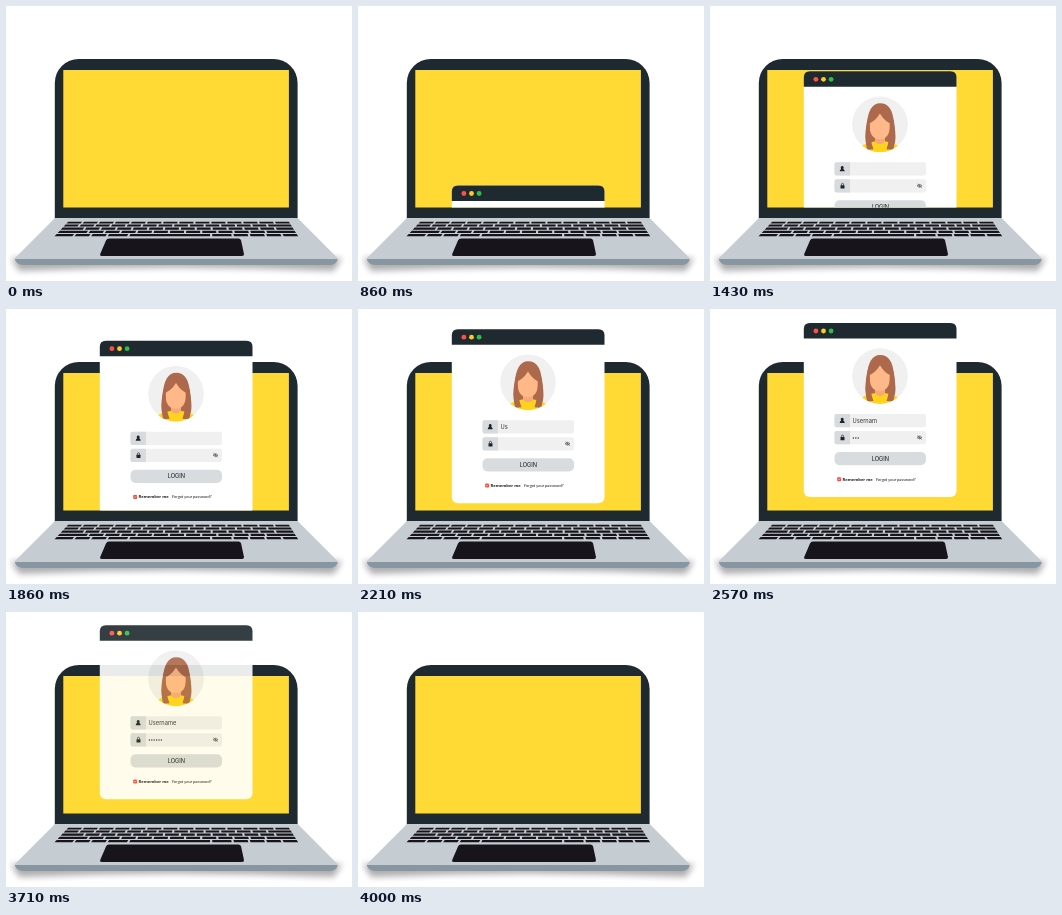
Write an HTML page that moves like this. It is 346 by 275 pixels and loops after 4210 ms.

```html
<!DOCTYPE html>
<html lang="en">
<head>
<meta charset="utf-8">
<title>Login on a laptop</title>
<style>
  html, body { margin: 0; width: 100%; height: 100%; overflow: hidden; background: #fff; }
  svg { display: block; width: 100%; height: 100%; }
  text { font-family: Inter, "Open Sans", sans-serif; fill: #15191c; }
</style>
</head>
<body>
<svg viewBox="0 0 346 275">
  <defs>
    <clipPath id="above"><rect width="346" height="201.5"/></clipPath>
    <clipPath id="round"><circle cx="170" cy="53" r="28"/></clipPath>
    <filter id="blur" x="-10%" y="-100%" width="120%" height="300%"><feGaussianBlur stdDeviation="3"/></filter>
  </defs>

  <!-- laptop -->
  <path d="M5 252H336L328 265Q170 258 13 265Z" fill="#000" opacity=".32" filter="url(#blur)"/>
  <path d="M48.8 213V77A24 24 0 0 1 72.8 53H267.6A24 24 0 0 1 291.6 77V213Z" fill="#1f2a30"/>
  <rect x="57.3" y="64" width="225.6" height="137.500" fill="#ffda35"/>
  <path d="M49 212H291.6L331.5 252V254H9V252Z" fill="#c5ccd2"/>
  <path d="M9 253H331.5V254Q330 259 323 259H18Q11 259 9 254Z" fill="#8796a1"/>
  <path id="keys" fill="#17151b"/>
  <path d="M103 232.5H232.5q2 0 2.600 2L238 248q.3 2-2 2H95.500q-2 0-1.300-2L100 234.500q.8-2 3-2Z" fill="#17151b"/>

  <!-- login window -->
  <g clip-path="url(#above)"><g id="card">
    <rect x="93.800" width="152.700" height="174" rx="6" fill="#fff"/>
    <path d="M93.800 15.500V6q0-6 6-6H240.500q6 0 6 6V15.500Z" fill="#1f2a30"/>
    <circle cx="105.900" cy="8" r="2.400" fill="#ff5147"/>
    <circle cx="113.500" cy="8" r="2.400" fill="#ffc928"/>
    <circle cx="121.100" cy="8" r="2.400" fill="#2fc042"/>

    <g clip-path="url(#round)">
      <circle cx="170" cy="53" r="28" fill="#f0f0f0"/>
      <path d="M170 32C162 32 158 40 157 52Q154 68 157 74H184Q187 68 184 52C183 39 179 32 170 32Z" fill="#ad694b"/>
      <path d="M148 82Q149 73 161 71L165 70H175L179 71Q191 73 192 82Z" fill="#ffd31c"/>
      <path d="M165 62H175V70.500Q170 75.500 165 70.500Z" fill="#f5a878"/>
      <path d="M159.300 54Q159 42 169.700 42Q180.500 42 180.200 54Q179.500 68 169.700 68Q160 68 159.300 54Z" fill="#ffb988"/>
      <path d="M172 38Q168 48 159.800 52Q159.500 68 163.500 78L157 78.500Q154 65 157 50Q160 36 172 38ZM168 38Q172 48 179.700 52Q180 68 176.500 78L183.500 78.500Q186 65 184 50Q180 36 168 38Z" fill="#ad694b"/>
    </g>

    <g id="fields"></g>
    <path d="M132.200 94.700a1.600 1.700 0 0 1 1 2.900Q134.700 98.200 134.700 100H129.700Q129.700 98.200 131.200 97.600A1.600 1.700 0 0 1 132.200 94.700Z" fill="#1f2327"/>
    <rect x="130.500" y="114" width="4" height="3.300" rx=".5" fill="#1f2327"/>
    <path d="M131.400 114.200V113.400a1.100 1.300 0 0 1 2.200 0V114.200" fill="none" stroke="#1f2327" stroke-width=".7"/>
    <g fill="none" stroke="#444" stroke-width=".6">
      <path d="M207 114.600Q209.500 111.500 212 114.600Q209.500 117.400 207 114.600ZM207.500 112.600L211.700 116.500"/>
      <circle cx="209.500" cy="114.500" r=".7"/>
    </g>
    <text id="user" x="142.600" y="99.600" font-size="5.700" style="fill:#333"></text>
    <g id="dots" fill="#333"></g>
    <rect x="124.500" y="129" width="91.500" height="13.300" rx="5" fill="#d9dcdf"/>
    <text x="170.400" y="137.600" font-size="5.650" text-anchor="middle">LOGIN</text>
    <rect x="127.200" y="154.300" width="3.900" height="3.900" rx="1" fill="#f9483c"/>
    <path d="M128.200 156.200L129 157L130.300 155.300" fill="none" stroke="#fff" stroke-width=".5"/>
    <text x="132.500" y="157.700" font-size="4.150" font-weight="700" style="font-family:'Open Sans',sans-serif">Remember me</text>
    <text x="166" y="157.700" font-size="4.250" font-style="italic" style="font-family:Lato,sans-serif">Forgot your password?</text>
  </g></g>
</svg>
<script>
const $ = id => document.getElementById(id);
const LOOP = 4210, STEP = 1000 / 14;

// keyboard: rows of relative key widths, in perspective
const plain = n => Array(n).fill(1);
const rows = [
  plain(14),
  [...plain(13), 1.6],
  [1.5, ...plain(12), 1.2],
  [1.9, ...plain(11), 1.9],
  [1.2, 1, 1, 1.3, 5, 1.3, 1, 1, 1, 1]
];
const ys = [215.8, 218.6, 221.6, 224.7, 227.9, 231.3];
const edge = (u, y) => {
  const d = y - 216, left = 61 - d * .95;
  return left + u * (284 + d * .65 - left);
};
$('keys').setAttribute('d', rows.map((row, i) => {
  const sum = row.reduce((a, b) => a + b), top = ys[i], low = ys[i + 1] - 1;
  let at = 0;
  return row.map(w => {
    const a = at / sum + .0045, b = (at += w) / sum - .0045;
    return `M${edge(a, top)} ${top}H${edge(b, top)}L${edge(b, low)} ${low}H${edge(a, low)}Z`;
  }).join('');
}).join(''));

$('fields').innerHTML = [91, 108].map(y =>
  `<rect x="124.500" y="${y}" width="91.500" height="13.300" rx="2" fill="#f0f0f1"/>
   <path d="M140 ${y}H126.500q-2 0-2 2v9.300q0 2 2 2H140Z" fill="#d8dbde"/>`).join('');
$('dots').innerHTML = [...Array(6).keys()].map(i =>
  `<circle cx="${143.400 + i * 2.400}" cy="114.900" r=".75"/>`).join('');

// window top by step, joined by a smooth curve
const path = [[10.7, 202], [16, 111], [18, 82.5], [20, 65.3], [26, 31.7], [34, 15.5], [36, 14], [40, 13.6]];
const slope = i => {
  const a = path[Math.max(i - 1, 0)], b = path[Math.min(i + 1, path.length - 1)];
  return (b[1] - a[1]) / (b[0] - a[0]);
};
function topAt(n) {
  if (n <= path[0][0]) return 202;
  if (n >= 45) return 13.2;
  const i = path.findIndex(p => p[0] > n) - 1;
  if (i < 0) return 13.6;
  const [x, y] = path[i], [x2, y2] = path[i + 1], h = x2 - x, u = (n - x) / h, v = 1 - u;
  return v * v * (1 + 2 * u) * y + u * u * (1 + 2 * v) * y2 + h * u * v * (v * slope(i) - u * slope(i + 1));
}

const clamp = (v, max) => Math.max(0, Math.min(max, v));

function draw(now) {
  const n = Math.floor((now % LOOP + 6) / STEP);
  const fade = clamp((n - 51) / 5, 1);
  $('card').setAttribute('transform', `translate(0 ${topAt(n)})`);
  $('card').setAttribute('opacity', .5 + .5 * Math.cos(Math.PI * fade));
  $('user').textContent = 'Username'.slice(0, clamp(n - 29, 8));
  const typed = clamp(Math.floor((n - 32.2) * .8), 6);
  [...$('dots').children].forEach((dot, i) => dot.setAttribute('opacity', i < typed ? 1 : 0));
}

let start;
function tick(now) {
  start ??= now;
  draw(now - start);
  requestAnimationFrame(tick);
}
draw(0);
requestAnimationFrame(tick);
</script>
</body>
</html>
```
